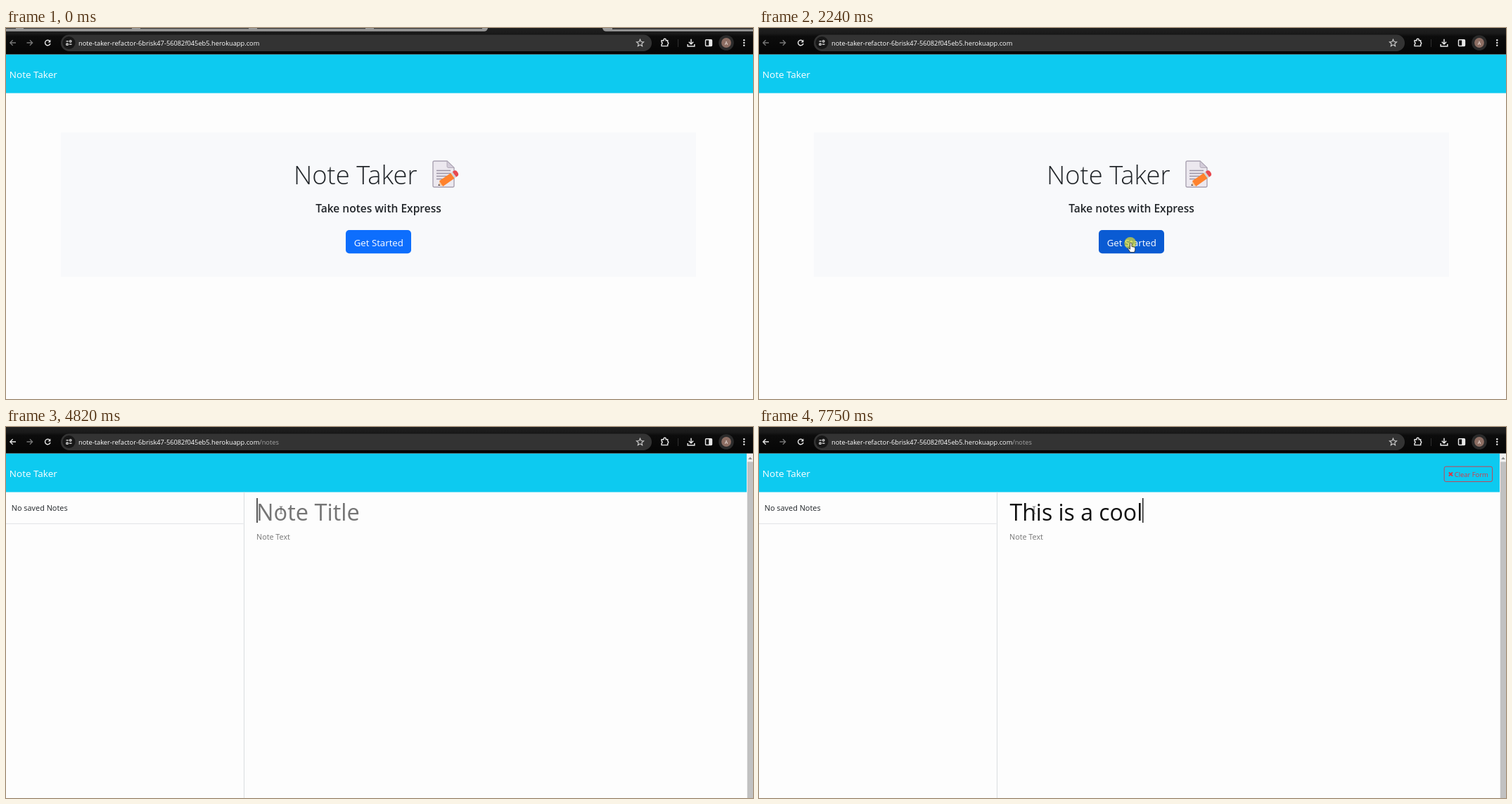
Write an HTML page with a canvas that moves like this. It is 1062x527 px and loops after 8000 ms.

```html
<!DOCTYPE html>
<html lang="en">
<head>
<meta charset="utf-8">
<title>Note Taker</title>
<style>
html, body { margin: 0; width: 100%; height: 100%; overflow: hidden; background: #fdfdfd; }
canvas { display: block; width: 1062px; height: 527px; }
</style>
</head>
<body>
<canvas id="stage" width="1062" height="527"></canvas>
<script>
const W = 1062, H = 527, LOOP = 8000, TOP = 37.5;
const ctx = document.getElementById('stage').getContext('2d');
const SANS = '"Open Sans", "Noto Sans", sans-serif';
const HOST = 'note-taker-refactor-6brisk47-56082f045eb5.herokuapp.com';

// Time of each keystroke, in order
const TITLE = 'This is a cool';
const KEYS = [5430, 5610, 5880, 6070, 6210, 6410, 6540, 6670, 6800, 7000, 7130, 7330, 7550, 7750];

const T = { enter: 370, hover: 990, hand: 1180, press: 2240, release: 2430, page: 2530,
            move: 3050, arrive: 3590, click: 3660, focus: 3740, unclick: 3870 };

const ARROW = new Path2D('M0 0V9.6L2.2 7.6L3.7 11L5.1 10.3L3.7 7.2H6.7Z');
const HAND = new Path2D('M-1.3 1.2a1.2 1.2 0 0 1 2.4 0V5.2L4.8 6Q6 6.4 6 7.6V10L4.8 13.4H-1L-3.8 9Q-4.6 7.4-3.4 7.2L-1.3 9Z');

function rect(x, y, w, h, fill) {
  ctx.fillStyle = fill;
  ctx.fillRect(x, y, w, h);
}

function round(x, y, w, h, r, fill, stroke, width = 1) {
  ctx.beginPath();
  ctx.roundRect(x, y, w, h, r);
  if (fill) { ctx.fillStyle = fill; ctx.fill(); }
  if (stroke) { ctx.strokeStyle = stroke; ctx.lineWidth = width; ctx.stroke(); }
}

function disc(x, y, r, fill) {
  ctx.beginPath();
  ctx.arc(x, y, r, 0, Math.PI * 2);
  ctx.fillStyle = fill;
  ctx.fill();
}

function line(d, color, width = 1) {
  ctx.strokeStyle = color;
  ctx.lineWidth = width;
  ctx.stroke(new Path2D(d));
}

function setFont(size, weight = 400) {
  ctx.font = `${weight} ${size}px ${SANS}`;
}

function text(str, x, y, size, color, weight = 400, align = 'left') {
  setFont(size, weight);
  ctx.fillStyle = color;
  ctx.textAlign = align;
  ctx.fillText(str, x, y);
}

function shape(path, x, y, fill, stroke, width) {
  ctx.save();
  ctx.translate(x, y);
  ctx.fillStyle = fill;
  ctx.fill(path);
  ctx.strokeStyle = stroke;
  ctx.lineWidth = width;
  ctx.stroke(path);
  ctx.restore();
}

const clamp = v => Math.max(0, Math.min(1, v));
const smooth = p => p * p * (3 - 2 * p);
const mix = (a, b, p) => a + (b - a) * p;

// Progress from start to end, held on a fixed number of steps
function stepped(t, start, end, steps) {
  return smooth(Math.floor(clamp((t - start) / (end - start)) * steps) / steps);
}

function blend(a, b, p) {
  return `rgb(${a.map((v, i) => Math.round(mix(v, b[i], p))).join()})`;
}

function drawTabs() {
  const gray = '#989898', dark = '#3b3b3b';
  round(-10, -6, 695, 10.8, 6, gray);
  round(848, -6, 230, 10.8, 6, gray);
  rect(0, 0, 14, 1.2, dark);
  for (let i = 0; i < 4; i++) rect(25 + i * 166, 0, 154, 1.2, dark);
  rect(862, 0, 200, 2, dark);
}

function drawToolbar(t) {
  const notes = t >= T.page;
  const bar = ctx.createLinearGradient(0, 0, 0, TOP);
  bar.addColorStop(0, '#202020');
  bar.addColorStop(0.2, '#1a1a1a');
  bar.addColorStop(0.32, '#0c0c0c');
  bar.addColorStop(1, '#050505');
  rect(0, 0, W, TOP, bar);
  if (t < T.press) drawTabs();

  const white = '#e8e8e8', dim = '#777';
  line('M14 21H5.8M9.6 17.2L5.8 21L9.6 24.8', notes ? white : dim, 1.3);
  line('M29.5 21H37.7M33.9 17.2L37.7 21L33.9 24.8', dim, 1.3);
  line('M62.3 18.6A3.8 3.8 0 1 0 63 22', white, 1.4);
  ctx.fillStyle = white;
  ctx.fill(new Path2D('M63.4 16.6V20.4H59.6Z'));

  round(78, 9.5, 840, 23.5, 11.75, '#333');
  disc(89.5, 21, 9, '#171717');
  line('M85.5 18.8H89M89.8 23.2H93.5', white, 1.2);
  ctx.strokeStyle = white;
  for (const [x, y] of [[91.7, 18.8], [87, 23.2]]) {
    ctx.beginPath();
    ctx.arc(x, y, 1.3, 0, 7);
    ctx.stroke();
  }

  text(HOST, 103, 25, 9.28, '#fff');
  if (notes) text('/notes', 103 + ctx.measureText(HOST).width, 25, 9.28, '#a5a5a5');

  ctx.beginPath();
  for (let i = 0; i < 10; i++) {
    const r = i % 2 ? 2.4 : 5.3, a = i * Math.PI / 5 - Math.PI / 2;
    ctx.lineTo(901.5 + r * Math.cos(a), 21.5 + r * Math.sin(a));
  }
  ctx.closePath();
  ctx.strokeStyle = '#ccc';
  ctx.lineWidth = 1.1;
  ctx.stroke();

  line('M932 17.8H935V16.8A1.6 1.6 0 0 1 938.2 16.8V17.8H940.7V20.2A1.6 1.6 0 0 1 940.7 23.2V25.6H932V23.2A1.7 1.7 0 0 0 932 20Z', white, 1.4);
  rect(955, 16, 1, 11, '#303030');
  line('M974 15.8V22.6M970.8 19.8L974 23L977.2 19.8M969.2 23V26H978.8V23', white, 1.5);
  round(994.5, 16.7, 9, 8.8, 1, null, white, 1.4);
  rect(999.2, 17, 4.3, 8.5, white);
  disc(1024, 21, 10.8, '#2b2b2b');
  disc(1024, 21, 6.9, '#8d6e63');
  text('A', 1024, 23.6, 7.2, '#f3e9e5', 400, 'center');
  for (const y of [17.2, 21, 24.8]) disc(1049.3, y, 1.2, white);
}

function drawMemo() {
  const page = new Path2D('M609 189H627L637 198.5V224Q637 226 635 226H609Q607 226 607 224V191Q607 189 609 189Z');
  shape(page, 0, 0, '#ece8ef', '#aaa3b2', 1.4);
  shape(new Path2D('M627 189V196.5Q627 198.5 629 198.5H637Z'), 0, 0, '#d3ccd9', '#aaa3b2', 0.8);
  line('M612 202.5H632M612 206.5H632M612 210.5H628M612 214.5H622', '#9a92a4', 1.3);
  ctx.save();
  ctx.translate(614.5, 224);
  ctx.rotate(-0.61);
  const part = (d, fill) => { ctx.fillStyle = fill; ctx.fill(new Path2D(d)); };
  part('M0 0L6-4.6V4.6Z', '#f4c9a0');
  part('M0 0L2.1-1.6V1.6Z', '#3f3940');
  part('M5-4.6H25V4.6H5Z', '#ff822d');
  part('M25-4.6H28V4.6H25Z', '#d3d3d3');
  part('M28-4.6H30Q33.5-4.6 33.5 0Q33.5 4.6 30 4.6H28Z', '#e8484f');
  ctx.restore();
}

function drawNavbar(width) {
  rect(0, TOP, width, 92.5 - TOP, '#0dcaf0');
  text('Note Taker', 4.8, 71, 13.5, '#fff');
}

function drawHome(t) {
  drawNavbar(W);
  rect(78, 148.5, 903, 205, '#f8f9fb');
  text('Note Taker', 409, 222, 36.4, '#212529', 300);
  drawMemo();
  text('Take notes with Express', 529.5, 262, 15.55, '#212529', 600, 'center');
  const hover = clamp((t - T.hover) / 150), press = clamp((t - T.press + 60) / 60);
  const blue = press > 0 ? blend([11, 94, 215], [10, 91, 211], press)
                         : blend([13, 110, 253], [11, 94, 215], hover);
  round(483, 287, 93, 33.3, 5, blue);
  text('Get Started', 529.8, 309.6, 13.25, '#fff', 400, 'center');
}

function caretShown(t) {
  if (t < T.focus) return false;
  if (t >= KEYS[0]) return true;
  return t < 4235 || (t >= 4820 && t < 5350);
}

function drawNotes(t) {
  const right = 1053;
  drawNavbar(right);
  rect(right, TOP, 9, H - TOP, '#f1f1f1');
  rect(right + 1, 49.5, 8, H - 49.5, '#c1c1c1');
  ctx.fillStyle = '#8a8a8a';
  ctx.fill(new Path2D('M1055.2 46L1058 42.6L1060.8 46Z'));

  text('No saved Notes', 7.7, 119.2, 10.9, '#212529');
  rect(0, 136.8, 337.5, 1, '#dfe2e5');
  rect(338, 92.5, 1, H - 92.5, '#dadde0');

  const typed = TITLE.slice(0, KEYS.filter(k => t >= k).length);
  if (typed) text(typed, 356.5, 133, 32, '#111');
  else text('Note Title', 356, 133, 32.6, '#757575');
  text('Note Text', 356, 160, 10.8, '#757575');
  if (caretShown(t)) {
    setFont(32);
    rect(356.3 + ctx.measureText(typed).width, 101, 1.4, 35, '#111');
  }

  if (typed) {
    const red = '#dc3545';
    round(974.2, 56.2, 68.4, 21.4, 2.5, null, red, 0.9);
    line('M980.8 64.5L986 69.7M986 64.5L980.8 69.7', red, 1.9);
    text('Clear Form', 988.8, 70.6, 9.35, red);
  }
}

function drawBeam(x, y) {
  line(`M${x - 2} ${y - 5}H${x - 0.5}L${x} ${y - 4.5}V${y + 4.5}L${x - 0.5} ${y + 5}H${x - 2}` +
       `M${x + 2} ${y - 5}H${x + 0.5}L${x} ${y - 4.5}M${x} ${y + 4.5}L${x + 0.5} ${y + 5}H${x + 2}`, '#444', 0.9);
}

function drawPointer(t) {
  const halo = 'rgba(232, 226, 40, 0.68)';
  if (t < T.enter) return;
  if (t < T.hand) {
    const p = stepped(t, T.enter, 1110, 11);
    shape(ARROW, mix(1007, 528, p), mix(517, 305, p), '#fff', '#222', 0.8);
  } else if (t < T.page) {
    if (t >= T.press && t < T.release) disc(527.8, 305.5, 8.5, halo);
    shape(HAND, 528.8, 305.2, '#fff', '#222', 0.8);
  } else if (t < T.move) {
    shape(ARROW, 528, 305.3, '#fff', '#333', 0.8);
  } else {
    const p = stepped(t, T.move - 60, T.arrive, 8);
    if (t >= T.click && t < T.unclick) disc(389.5, 117.5, 8.5, halo);
    drawBeam(mix(528, 391, p), mix(305, 118, p));
  }
}

function frame(now) {
  const t = now % LOOP;
  rect(0, 0, W, H, '#fdfdfd');
  if (t < T.page) drawHome(t); else drawNotes(t);
  drawToolbar(t);
  drawPointer(t);
  requestAnimationFrame(() => frame(performance.now()));
}

frame(performance.now());
</script>
</body>
</html>
```
